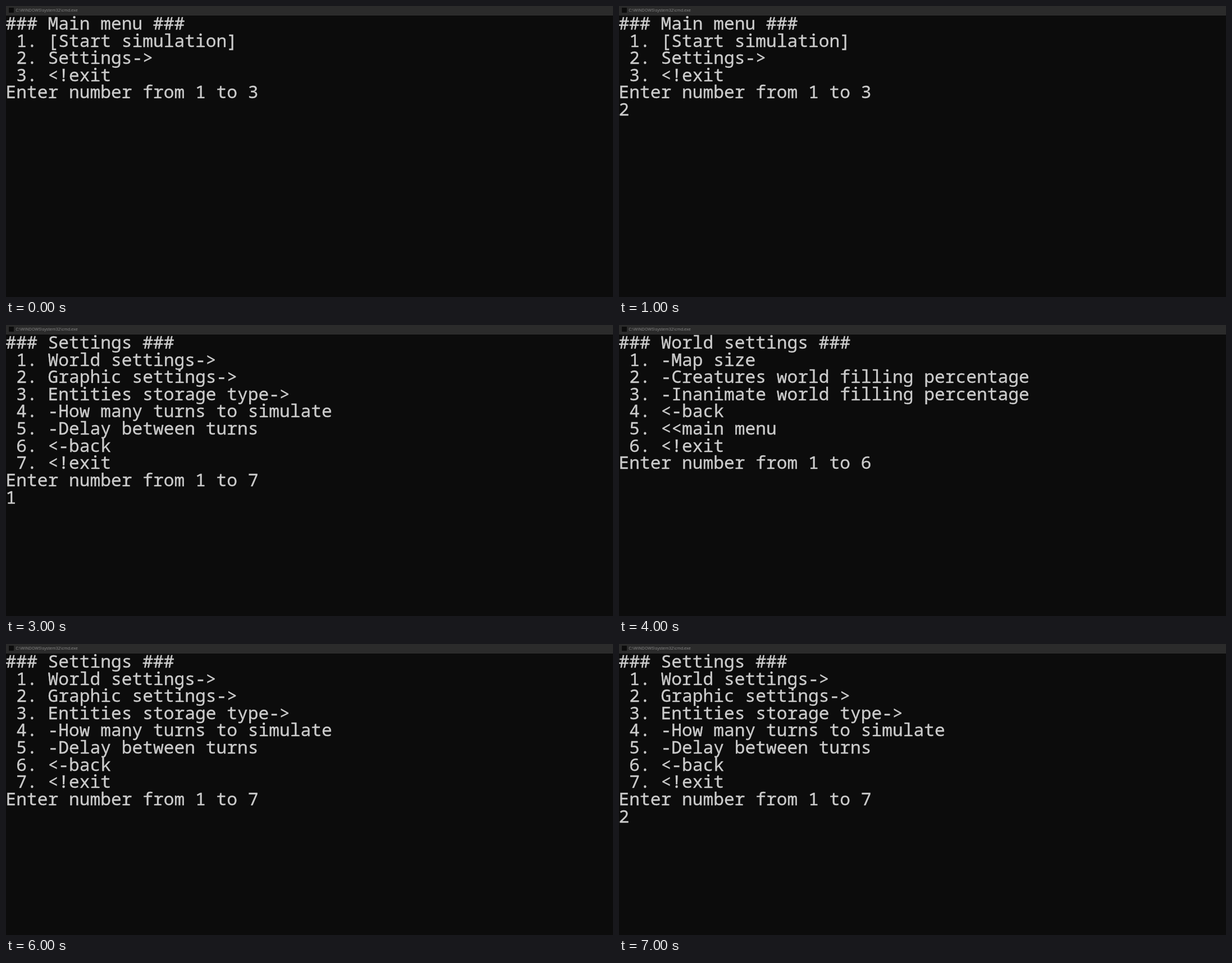
Animation, 1081 px wide and 518 px high, one loop 8 s. Source, as an HTML page:

```html
<!DOCTYPE html>
<html lang="en">
<head>
<meta charset="utf-8">
<title>Console menu</title>
<style>
  html, body { margin: 0; width: 100%; height: 100%; overflow: hidden; background: #0c0c0c; }
  svg { display: block; width: 100%; height: 100%; }
  text { white-space: pre; font-variant-ligatures: none; }
  .title { font: 7.24px "Open Sans", "Noto Sans", sans-serif; fill: #8c8c8c; }
  .line {
    font: 31.25px "Noto Sans Mono", "DejaVu Sans Mono", monospace;
    fill: #ccc; stroke: #ccc; stroke-width: 0.35px;
  }
</style>
</head>
<body>
<svg viewBox="0 0 1081 518" preserveAspectRatio="none">
  <rect width="1081" height="518" fill="#0c0c0c"/>
  <rect width="1081" height="17" fill="#2b2b2b"/>
  <rect x="5" y="3" width="9" height="9" fill="#0c0c0c"/>
  <text class="title" x="17.3" y="10.2">C:\WINDOWS\system32\cmd.exe</text>
  <g id="screen"></g>
</svg>
<script>
const STEP = 1000;
const LEFT = -0.5;
const BASELINE = 42;
const ROW_HEIGHT = 30.62;

const menu = (title, items) => [
  `### ${title} ###`,
  ...items.map((item, i) => ` ${i + 1}. ${item}`),
  `Enter number from 1 to ${items.length}`
];

const main = menu("Main menu", ["[Start simulation]", "Settings->", "<!exit"]);
const settings = menu("Settings", [
  "World settings->", "Graphic settings->", "Entities storage type->",
  "-How many turns to simulate", "-Delay between turns", "<-back", "<!exit"
]);
const world = menu("World settings", [
  "-Map size", "-Creatures world filling percentage",
  "-Inanimate world filling percentage", "<-back", "<<main menu", "<!exit"
]);

// Each menu waits one step, then shows the typed answer for one step.
const visits = [[main, "2"], [settings, "1"], [world, "4"], [settings, "2"]];
const screens = visits.flatMap(([lines, answer]) => [lines, [...lines, answer]]);

const screen = document.getElementById("screen");
const rows = Array.from({ length: 10 }, (_, i) => {
  const row = document.createElementNS("http://www.w3.org/2000/svg", "text");
  row.setAttribute("class", "line");
  row.setAttribute("x", LEFT);
  row.setAttribute("y", BASELINE + i * ROW_HEIGHT);
  return screen.appendChild(row);
});

let shown = -1;

function draw(time) {
  const index = Math.floor(time / STEP) % screens.length;
  if (index === shown) return;
  shown = index;
  rows.forEach((row, i) => { row.textContent = screens[index][i] || ""; });
}

function tick() {
  draw(performance.now());
  requestAnimationFrame(tick);
}

tick();
</script>
</body>
</html>
```
